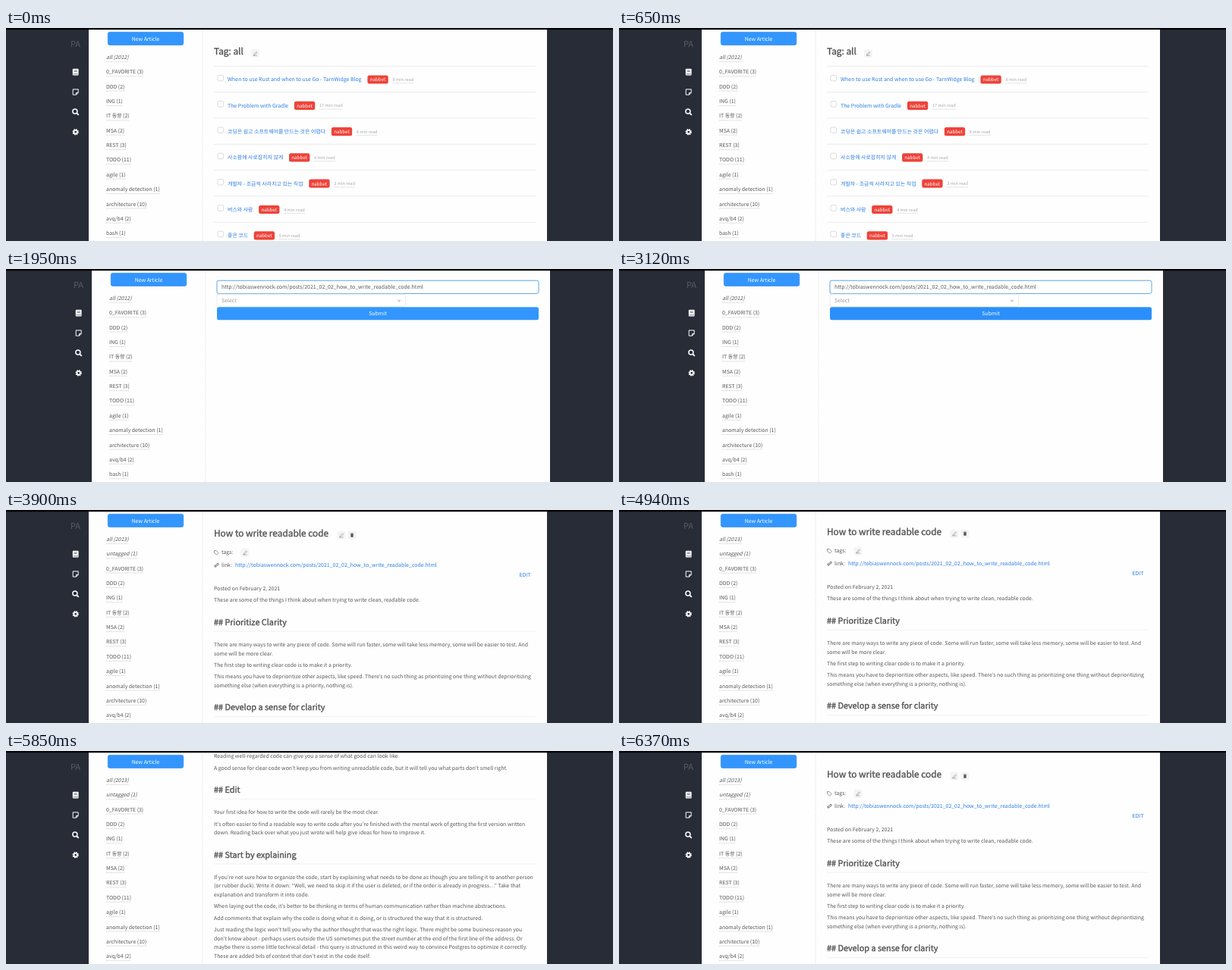
Animation, 800 px wide and 281 px high, one loop 7800 ms. Source, as an HTML page:

```html
<!DOCTYPE html>
<html lang="en">
<head>
<meta charset="utf-8">
<title>Reading list</title>
<style>
  html, body { margin: 0; width: 100%; height: 100%; overflow: hidden; background: #272c37; }
  svg { display: block; width: 100vw; height: 100vh; }
  text { font-family: "Noto Sans CJK KR", "Noto Sans CJK JP", sans-serif; text-rendering: geometricPrecision; white-space: pre; }
</style>
</head>
<body>
<svg viewBox="0 0 800 281">
  <rect width="800" height="281" fill="#272c37"/>
  <g id="page">
    <rect x="109" width="604" height="281" fill="#fefefe"/>
    <path d="M259 0V281" stroke="#e2e2e2" stroke-width=".8" stroke-dasharray="2 1"/>
    <g id="nav"></g>
    <g id="tagsBefore"></g>
    <g id="tagsAfter"></g>
    <path id="spinner" d="M116.2 31.4A3.4 3.4 0 0 1 121.8 31.4" fill="none" stroke="#666" stroke-width=".9"/>
    <g id="list"></g>
    <g id="form"></g>
    <g id="article"></g>
  </g>
  <rect width="800" height="2.2" fill="#000"/>
</svg>
<script>
const LOOP = 7800, STEP = 130, SCROLL = 352.5;
const SIZE = 6.95, TITLE = 11.85, SUBTITLE = 10.85, LINE = 11.55, LEFT = 274, RIGHT = 698;
const INK = '#575757', LINK = '#2b7de0', BLUE = '#3296fe';
const URL_TEXT = 'http://tobiaswennock.com/posts/2021_02_02_how_to_write_readable_code.html';

const $ = id => document.getElementById(id);
const ruler = document.createElement('canvas').getContext('2d');
ruler.font = '100px "Noto Sans CJK KR", "Noto Sans CJK JP", sans-serif';
const widthOf = (str, size = SIZE) => ruler.measureText(str).width * size / 100;

const text = (x, y, str, fill = INK, size = SIZE, attrs = '') =>
  `<text x="${x}" y="${y}" fill="${fill}" font-size="${size}" ${attrs}>${str}</text>`;
// The headings are a regular face thickened by a thin outline.
const heading = (y, str, size) =>
  text(LEFT, y, str, '#505050', size, 'stroke="#505050" stroke-width=".35"');
const box = (x, y, w, h, attrs, r = 2.5) =>
  `<rect x="${x}" y="${y}" width="${w}" height="${h}" rx="${r}" ${attrs}/>`;
const path = (d, stroke, width, attrs = '') =>
  `<path d="${d}" fill="none" stroke="${stroke}" stroke-width="${width}" ${attrs}/>`;
const rule = (y, color = '#e9e9e9') => path(`M${LEFT} ${y}H${RIGHT}`, color, 0.9);
const dotted = (x, y, w) => path(`M${x} ${y}h${w}`, '#bbb', 0.7, 'stroke-dasharray="1 .8"');
const button = (x, y, w, str, attrs = '') =>
  box(x, y, w, 17, `fill="${BLUE}" ${attrs}`) +
  text(x + w / 2, y + 11.2, str, '#fff', SIZE, 'text-anchor="middle"');

const chip = (x, y) => box(x - 5.5, y - 5.5, 11, 11, 'fill="#f4f4f4"');
const pencil = (x, y) => chip(x, y) +
  path(`M${x - 1.8} ${y + 1.2}l3.4 -3.4l1 1l-3.4 3.4l-1.3 .3zM${x - 2.6} ${y + 2.8}h5`, '#888', 0.6);
const bin = (x, y) => chip(x, y) +
  path(`M${x - 2.2} ${y - 1.8}h4.4M${x - 0.8} ${y - 2.5}h1.6`, '#555', 0.7) +
  box(x - 1.7, y - 1.3, 3.4, 3.8, 'fill="#555"', 0.5);

function nav() {
  return text(85, 25, 'PA', '#5a5d63', 11) +
    box(87.8, 53.8, 7.8, 8.6, 'fill="#fff"', 1) +
    path('M89.6 56h4.2M89.6 57.6h4.2M88.6 60.7h6.4', '#272c37', 0.6) +
    path('M88.2 80.9h7v4.6l-2.6 2.6h-4.4zM95 85.4h-2.5v2.6', '#fff', 1) +
    '<circle cx="90.9" cy="110" r="3" fill="none" stroke="#fff" stroke-width="1.5"/>' +
    path('M93.1 112.2l2.7 2.7', '#fff', 1.7) +
    '<circle cx="91.7" cy="137.2" r="2.3" fill="none" stroke="#fff" stroke-width="1.9"/>' +
    '<circle cx="91.7" cy="137.2" r="3.5" fill="none" stroke="#fff" stroke-width="1.4" stroke-dasharray="1.5 1.25"/>' +
    button(134.3, 5.4, 99.5, 'New Article', 'stroke="#2d88ea" stroke-width=".7"');
}

const TAGS = ['0_FAVORITE (3)', 'DDD (2)', 'ING (1)', 'IT 동향 (2)', 'MSA (2)', 'REST (3)', 'TODO (11)',
  'agile (1)', 'anomaly detection (1)', 'architecture (10)', 'avq/b4 (2)', 'bash (1)'];

const sidebar = (...special) => [...special, ...TAGS].map((tag, i) => {
  const y = 41 + i * 19.35;
  return text(132, y, tag, INK, SIZE, i < special.length ? 'font-style="italic"' : '') +
    dotted(132, y + 3.4, widthOf(tag));
}).join('');

const POSTS = [
  ['When to use Rust and when to use Go - TarnWidge Blog', 8],
  ['The Problem with Gradle', 17],
  ['코딩은 쉽고 소프트웨어를 만드는 것은 어렵다', 8],
  ['사소함에 사로잡히지 않게', 4],
  ['개발자 - 조금씩 사라지고 있는 직업', 3],
  ['버스와 사람', 4],
  ['좋은 코드', 5],
];

function list() {
  const rows = POSTS.map(([title, minutes], i) => {
    const y = 70.4 + i * 34.3, badge = 292 + widthOf(title) + 7.6, note = badge + 33;
    const read = minutes + ' min read';
    return rule(y - 20) +
      box(279, y - 8, 7.4, 7.4, 'fill="#fff" stroke="#d2d2d2" stroke-width=".8"', 1.5) +
      text(292, y, title, LINK) +
      box(badge, y - 8, 27.3, 11.2, 'fill="#ee433a"') +
      text(badge + 13.6, y - 0.1, 'nabbet', '#fff', 6.2, 'text-anchor="middle"') +
      text(note, y - 0.4, read, '#aaa', 5.65) +
      dotted(note, y + 2.4, widthOf(read, 5.65));
  });
  return heading(35.3, 'Tag: all', TITLE) + pencil(328.5, 33.5) + rows.join('');
}

function form() {
  return box(274, 15.2, 424, 17.2, 'id="field" fill="#fff" stroke-width=".9"') +
    text(280, 26.4, '', INK, SIZE, 'id="url"') +
    path('M280.4 19V28', '#222', 0.8, 'id="caret"') +
    box(274, 33.2, 248.5, 16.6, 'fill="#fff" stroke="#e6e6e6" stroke-width=".8"') +
    text(280, 44.3, 'Select', '#999') +
    path('M512.4 41l1.7 1.7l1.7 -1.7', '#777', 0.9) +
    button(274, 50.2, 424, 'Submit', 'id="submit"');
}

const BODY = `Posted on February 2, 2021
These are some of the things I think about when trying to write clean, readable code.
## Prioritize Clarity
There are many ways to write any piece of code. Some will run faster, some will take less memory, some will be easier to test. And|some will be more clear.
The first step to writing clear code is to make it a priority.
This means you have to deprioritize other aspects, like speed. There’s no such thing as prioritizing one thing without deprioritizing|something else (when everything is a priority, nothing is).
## Develop a sense for clarity
To write clear code, you need to be able to tell when code is clear and when it is not. That takes practice, and it takes some|time.
Notice when code is hard to follow, and ask what makes it hard.
Notice when code is easy to follow, too. Look at how it is named, how it is split up, and how much you had to keep in mind|while reading it.
Reading well-regarded code can give you a sense of what good can look like.
A good sense for clear code won’t keep you from writing unreadable code, but it will tell you what parts don’t smell right.
## Edit
Your first idea for how to write the code will rarely be the most clear.
It’s often easier to find a readable way to write code after you’re finished with the mental work of getting the first version written|down. Reading back over what you just wrote will help give ideas for how to improve it.
## Start by explaining
If you’re not sure how to organize the code, start by explaining what needs to be done as though you are telling it to another person|(or rubber duck). Write it down: “Well, we need to skip it if the user is deleted, or if the order is already in progress…” Take that|explanation and transform it into code.
When laying out the code, it’s better to be thinking in terms of human communication rather than machine abstractions.
Add comments that explain why the code is doing what it is doing, or is structured the way that it is structured.
Just reading the logic won’t tell you why the author thought that was the right logic. There might be some business reason you|don’t know about - perhaps users outside the US sometimes put the street number at the end of the first line of the address. Or|maybe there is some little technical detail - this query is structured in this weird way to convince Postgres to optimize it correctly.|These are added bits of context that don’t exist in the code itself.`;

function article() {
  let y = 106, out = heading(35.3, 'How to write readable code', TITLE) +
    pencil(442, 33.2) + bin(456, 33.2) +
    path('M274.4 53.6h2.8l3 3l-2.6 2.6l-3.2 -3.2z', '#777', 0.8) + text(284, 58.2, 'tags:') + pencil(315, 56.2) +
    path('M276.6 73.8l2 -2M276.4 72l-1.2 1.2a1.1 1.1 0 0 0 1.6 1.6l1 -1M277.2 71.6l1 -1a1.1 1.1 0 0 1 1.6 1.6l-1.2 1.2', '#555', 1) +
    text(284, 75.4, 'link:') + text(302, 75.4, URL_TEXT, LINK) +
    text(676.5, 88.4, 'EDIT', LINK);
  for (const block of BODY.split('\n')) {
    if (block.startsWith('##')) {
      y += 15.15;
      out += heading(y, block, SUBTITLE) + rule(y + 8.3, '#f0f0f0');
      y += 28.2;
    } else {
      for (const line of block.split('|')) {
        out += text(LEFT, y, line);
        y += LINE;
      }
      y += 3.8;
    }
  }
  return out;
}

$('nav').innerHTML = nav();
$('tagsBefore').innerHTML = sidebar('all (2012)');
$('tagsAfter').innerHTML = sidebar('all (2013)', 'untagged (1)');
$('list').innerHTML = list();
$('form').innerHTML = form();
$('article').innerHTML = article();

const show = (id, on) => $(id).setAttribute('display', on ? 'inline' : 'none');
const within = (t, from, to) => t >= from && t < to;
function ease(t, from, to) {
  const u = Math.min(1, Math.max(0, (t - from) / (to - from)));
  return u < 0.5 ? 2 * u * u : 1 - 2 * (1 - u) ** 2;
}

function draw(t) {
  const view = t < 910 ? 'list' : t < 3380 ? 'form' : 'article';
  const loading = within(t, 910, 1300) || within(t, 3380, 3640);
  const pasted = t >= 1560;
  for (const id of ['list', 'form', 'article']) show(id, id === view);
  show('tagsBefore', !loading && view !== 'article');
  show('tagsAfter', !loading && view === 'article');
  show('spinner', loading);
  show('caret', !pasted);

  // Without a scrollbar the centred page sits slightly further right.
  $('page').setAttribute('transform', `translate(${view === 'form' ? 4 : 0})`);
  $('spinner').setAttribute('transform', `rotate(${(t - 1170) * 0.36} 119 33.3)`);
  $('field').setAttribute('stroke', t < 1300 ? '#d9d9d9' : '#4b9ae0');
  $('submit').setAttribute('fill', t < 2340 ? BLUE : '#2b8ffb');
  $('url').textContent = pasted ? URL_TEXT : 'URL';
  $('url').setAttribute('fill', pasted ? INK : '#8a8a8a');

  const scroll = SCROLL * (ease(t, 4918, 5330) - ease(t, 6110, 6370));
  $('article').setAttribute('transform', `translate(0 ${-scroll})`);
}

function tick() {
  const t = performance.now() % LOOP;
  draw(Math.floor(t / STEP) * STEP);
  requestAnimationFrame(tick);
}
tick();
</script>
</body>
</html>
```
